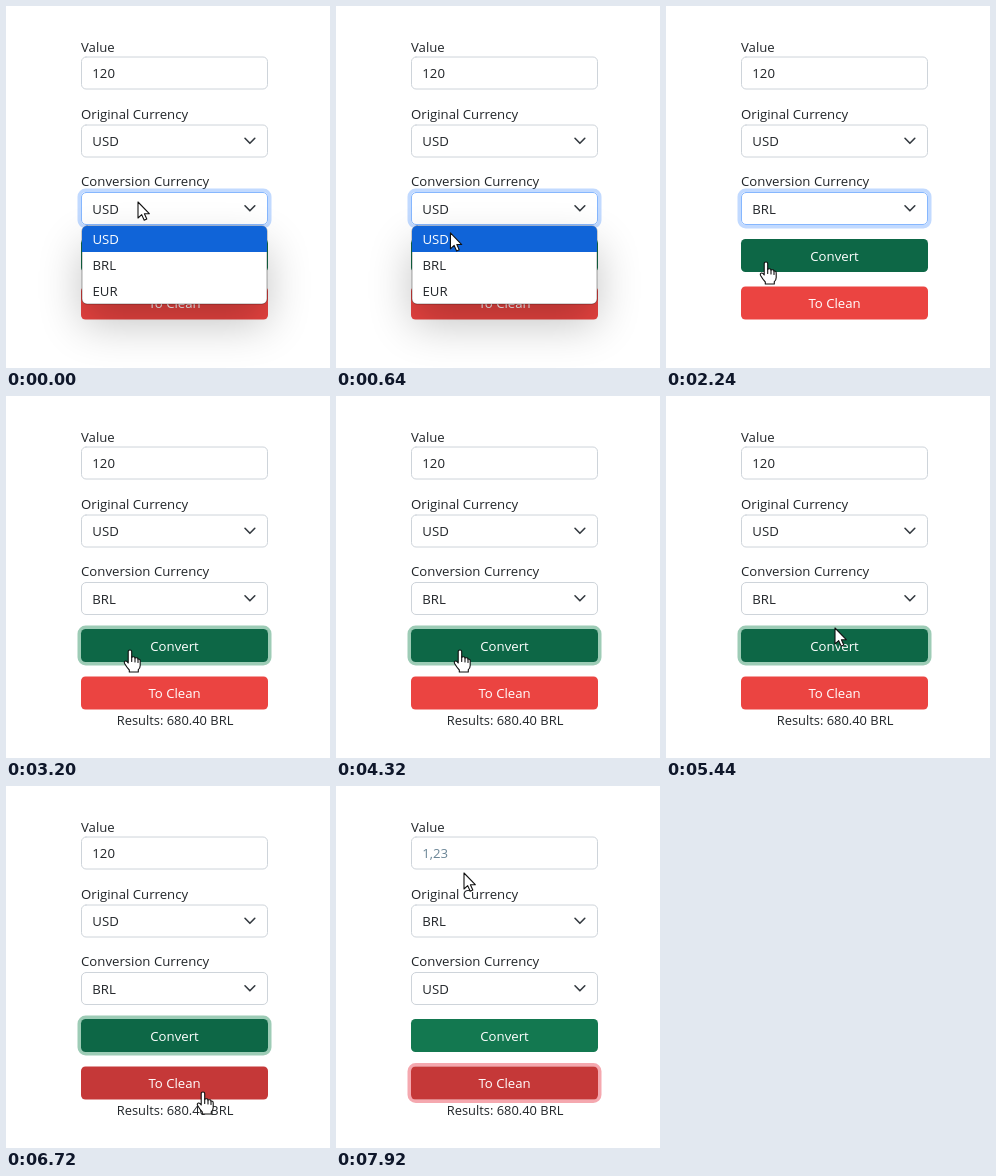
An HTML page with a canvas for the animation above (8 s loop, 324 by 362 pixels).

```html
<!DOCTYPE html>
<html lang="en">
<head>
<meta charset="utf-8">
<title>Currency converter</title>
<style>
html, body { margin: 0; width: 100%; height: 100%; overflow: hidden; background: #fff; }
canvas { display: block; width: 324px; height: 362px; }
</style>
</head>
<body>
<canvas id="stage"></canvas>
<script>
const W = 324, H = 362, LOOP = 8000;
const canvas = document.getElementById('stage');
const ctx = canvas.getContext('2d');
const dpr = window.devicePixelRatio || 1;
canvas.width = W * dpr;
canvas.height = H * dpr;

const FONT = '"Open Sans", "Noto Sans", sans-serif';
const INK = '#212529';
const LEFT = 75, WIDTH = 187, TALL = 33;
const ROWS = { convert: 233, clean: 280.5 };
const GREEN = [[19, 120, 80], [13, 103, 70]];
const RED = [[235, 68, 65], [197, 56, 56]];

// Moments when the user clicks
const PICK = 1960, CONVERT = 3000, CLEAN = 6900, FADE = 150;

// Pointer stops: time, x, y
const PATH = [
  [0, 132, 196], [250, 132, 196], [1000, 99, 254], [1960, 99, 254],
  [2240, 100, 256], [2500, 100, 256], [2900, 124, 254], [4500, 124, 254],
  [5440, 169, 232], [5950, 199, 338], [6500, 197, 306], [7050, 197, 306],
  [7840, 128, 87], [8000, 128, 87]
];

const clamp = v => Math.max(0, Math.min(1, v));
const ramp = (t, start) => clamp((t - start) / FADE);
const pulse = (t, start, end) => ramp(t, start) - ramp(t, end);
const mix = (a, b, k) => `rgb(${a.map((v, i) => Math.round(v + (b[i] - v) * k))})`;

function pointerAt(t) {
  let i = 1;
  while (i < PATH.length - 1 && t > PATH[i][0]) i++;
  const a = PATH[i - 1], b = PATH[i];
  const p = clamp((t - a[0]) / (b[0] - a[0]));
  const k = p * p * (3 - 2 * p);
  return { x: a[1] + (b[1] - a[1]) * k, y: a[2] + (b[2] - a[2]) * k };
}

function over(t, top) {
  const p = pointerAt(t);
  return t >= PICK && p.x > LEFT && p.x < LEFT + WIDTH && p.y > top && p.y < top + TALL;
}

// Averages the recent hover state to get the colour transition
function hoverLevel(t, top) {
  let sum = 0;
  for (let i = 0; i < 10; i++) sum += over(t - i * FADE / 10, top) ? 1 : 0;
  return sum / 10;
}

function text(str, x, y, color = INK, align = 'left', size = 13.2) {
  ctx.font = `${size}px ${FONT}`;
  ctx.textAlign = align;
  ctx.fillStyle = color;
  ctx.fillText(str, x, y);
}

function box(x, y, w, h, r) {
  ctx.beginPath();
  ctx.roundRect(x, y, w, h, r);
}

function ring(y, color, level) {
  if (level <= 0) return;
  ctx.save();
  ctx.globalAlpha = level;
  ctx.strokeStyle = color;
  ctx.lineWidth = 3.5;
  box(LEFT - 1.75, y - 1.75, WIDTH + 3.5, TALL + 3.5, 6.5);
  ctx.stroke();
  ctx.restore();
}

function field(y, value, color = INK, focus = 0) {
  ring(y, 'rgba(13,110,253,.25)', focus);
  box(LEFT + .5, y + .5, WIDTH - 1, TALL - 1, 4.5);
  ctx.fillStyle = '#fff';
  ctx.fill();
  ctx.strokeStyle = mix([206, 212, 218], [134, 183, 254], focus);
  ctx.lineWidth = 1;
  ctx.stroke();
  text(value, LEFT + 11.3, y + 21.5, color);
}

function select(y, value, focus) {
  field(y, value, INK, focus);
  ctx.beginPath();
  ctx.moveTo(239, y + 13.8);
  ctx.lineTo(243.9, y + 18.8);
  ctx.lineTo(248.8, y + 13.8);
  ctx.strokeStyle = '#343a40';
  ctx.lineWidth = 1.6;
  ctx.lineCap = ctx.lineJoin = 'round';
  ctx.stroke();
}

function button(y, label, colors, dark, ringColor, focus) {
  ring(y, ringColor, focus);
  box(LEFT, y, WIDTH, TALL, 4.5);
  ctx.fillStyle = mix(colors[0], colors[1], dark);
  ctx.fill();
  text(label, 168.5, y + 21.7, '#fff', 'center');
}

function menu(active) {
  const x = 76, y = 220, w = 185, row = 26;
  ctx.save();
  ctx.shadowColor = 'rgba(0,0,0,.24)';
  ctx.shadowBlur = 44 * dpr;
  ctx.shadowOffsetY = 20 * dpr;
  box(x, y, w, row * 3, 5);
  ctx.fillStyle = '#fff';
  ctx.fill();
  ctx.restore();

  ctx.save();
  box(x, y, w, row * 3, 5);
  ctx.strokeStyle = 'rgba(0,0,0,.35)';
  ctx.lineWidth = 1;
  ctx.stroke();
  ctx.clip();
  ctx.fillStyle = '#1064d8';
  ctx.fillRect(x, y + active * row, w, row);
  ['USD', 'BRL', 'EUR'].forEach((name, i) =>
    text(name, x + 10.5, y + 18 + i * row, i === active ? '#fff' : INK));
  ctx.restore();
}

const ARROW = new Path2D('M0 0V16L3.7 12.6L6.2 18.2L8.8 17L6.4 11.7H11.3Z');
const HAND = new Path2D(
  'M-1.8 1.6Q-1.8 0 0 0Q1.7 0 1.7 1.6V7.2Q4.4 5.9 5 8Q7.5 7 8 9.1' +
  'Q10.2 8.8 10.2 11V15.5Q10.2 18 8.3 19.6V22H-.7V20Q-3.2 17.5-5.4 13.6' +
  'Q-6.3 11.6-4.5 11Q-3.2 10.7-1.8 13Z');
const KNUCKLES = new Path2D('M1.7 7V11.5M5 8V12M8 9.2V12.5');

function pointer(p, hand) {
  ctx.save();
  ctx.translate(p.x, p.y);
  ctx.lineJoin = 'round';
  ctx.lineWidth = 1.1;
  ctx.strokeStyle = '#111';
  ctx.fillStyle = '#fff';
  const shape = hand ? HAND : ARROW;
  ctx.fill(shape);
  ctx.stroke(shape);
  if (hand) ctx.stroke(KNUCKLES);
  ctx.restore();
}

function draw(t) {
  ctx.setTransform(dpr, 0, 0, dpr, 0, 0);
  ctx.fillStyle = '#fff';
  ctx.fillRect(0, 0, W, H);

  const cleared = t >= CLEAN;
  const p = pointerAt(t);
  const convertFocus = pulse(t, CONVERT, CLEAN);
  const cleanFocus = ramp(t, CLEAN);

  text('Value', LEFT, 45.5);
  field(50.5, cleared ? '1,23' : '120', cleared ? '#6a8596' : INK);
  text('Original Currency', LEFT, 113);
  select(118.5, cleared ? 'BRL' : 'USD', 0);
  text('Conversion Currency', LEFT, 180.3);
  select(186, t >= PICK && !cleared ? 'BRL' : 'USD', 1 - ramp(t, CONVERT));

  button(ROWS.convert, 'Convert', GREEN,
    Math.max(hoverLevel(t, ROWS.convert), convertFocus),
    'rgba(60,153,110,.5)', convertFocus);
  button(ROWS.clean, 'To Clean', RED,
    Math.max(hoverLevel(t, ROWS.clean), cleanFocus),
    'rgba(235,83,97,.5)', cleanFocus);

  if (t >= CONVERT + 160) text('Results: 680.40 BRL', 169, 329, INK, 'center', 12.9);
  if (t < PICK) menu(p.y > 246 ? 1 : 0);
  pointer(p, over(t, ROWS.convert) || over(t, ROWS.clean));
}

function tick() {
  draw(performance.now() % LOOP);
  requestAnimationFrame(tick);
}
tick();
</script>
</body>
</html>
```
